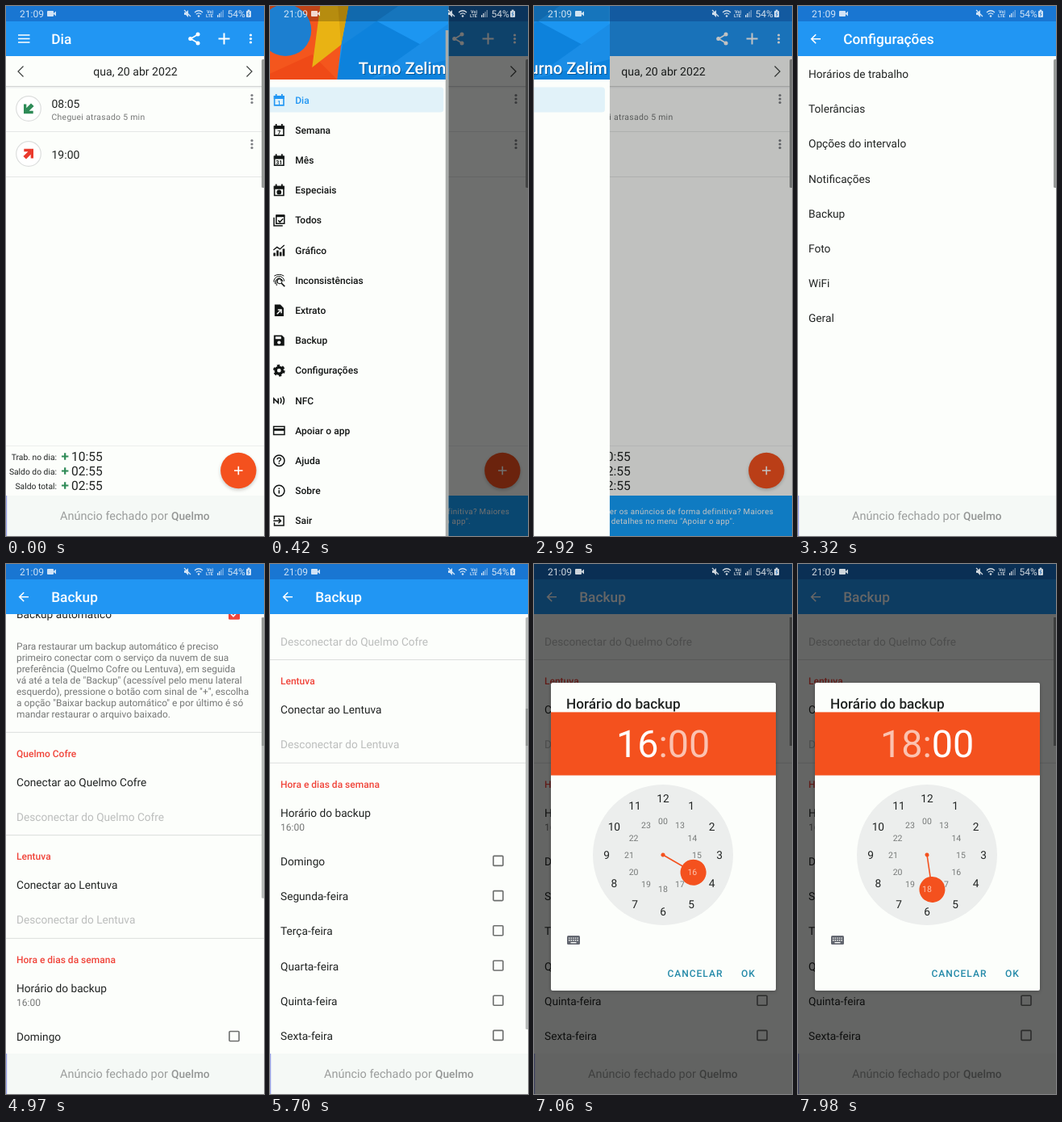
An HTML page that plays this animation: 320 by 656 pixels, repeating every 8000 ms.

```html
<!DOCTYPE html>
<html lang="pt">
<head>
<meta charset="utf-8">
<title>Controle de horas</title>
<style>
html, body { margin: 0; width: 100%; height: 100%; overflow: hidden; background: #fcfefb; }
svg { display: block; width: 100vw; height: 100vh; }
text { font-family: Roboto, sans-serif; text-rendering: geometricPrecision; white-space: pre; }
</style>
</head>
<body>
<svg id="stage" viewBox="0 0 320 656"></svg>
<script>
const LOOP = 8000;
const BLUE = '#2196f3', ORANGE = '#f4511e', RED = '#f0443a';
const INK = '#212423', GREY = '#757776', PAPER = '#fcfefb';

const rect = (x, y, w, h, fill, more = '') =>
  `<rect x="${x}" y="${y}" width="${w}" height="${h}" fill="${fill}" ${more}/>`;
const circle = (x, y, r, fill, more = '') =>
  `<circle cx="${x}" cy="${y}" r="${r}" fill="${fill}" ${more}/>`;
const fill = (d, color = 'currentColor') => `<path d="${d}" fill="${color}"/>`;
const line = (d, color = 'currentColor', w = 1.5, more = '') =>
  `<path d="${d}" fill="none" stroke="${color}" stroke-width="${w}" ${more}/>`;
const text = (x, y, size, str, color = INK, more = '') =>
  `<text x="${x}" y="${y}" font-size="${size}" fill="${color}" ${more}>${str}</text>`;
const group = (id, body, more = '') => `<g id="${id}" ${more}>${body}</g>`;
const at = (x, y, body, more = '') => `<g transform="translate(${x} ${y})" ${more}>${body}</g>`;

const MEDIUM = 'font-weight="500"', MIDDLE = 'text-anchor="middle"', END = 'text-anchor="end"';

// ---- shared pieces

const appBar = title =>
  rect(0, 0, 320, 19, '#1976d2') + rect(0, 19, 320, 43, BLUE) +
  text(56.2, 47, 17.3, title, '#fff', MEDIUM);

const backArrow = line('M28 40.8H17M22.2 35.3L16.7 40.8L22.2 46.3', '#fff', 1.6);

const closedAd =
  rect(0, 606, 320, 50, '#f5f9f6') + rect(0, 606, 1.2, 50, '#9aa4ea') +
  text(67, 636, 14.5, 'Anúncio fechado por', '#9b9d9c') +
  text(205, 636, 13.7, 'Quelmo', '#949695', MEDIUM);

const dots = (x, y, color, gap = 4.5) =>
  [-gap, 0, gap].map(d => circle(x, y + d, 1.6, color)).join('');

const scrollThumb = rect(317, 66, 4, 159, '#979a98', 'rx="1.5"');

const screen = (title, body, bar = backArrow) =>
  rect(0, 0, 320, 656, PAPER) + body + appBar(title) + bar + closedAd;

const status =
  text(17, 13.7, 12, '21:09', '#fff') +
  rect(51, 6, 8, 7, '#fff', 'rx="1"') + fill('M59 9l3-2.5v6l-3-2.5z', '#fff') +
  fill('M221 8h2l3-3v9l-3-3h-2z', '#fff') + line('M221 5l8 8', '#fff', 1.2) +
  line('M234 8q5-4.5 10 0M235.8 10.3q3.2-3 6.4 0', '#fff', 1.2) + circle(239, 12.5, 1.3, '#fff') +
  text(249, 9, 5.4, 'Vo)', '#fff', 'font-weight="700"') +
  text(248, 14, 5.4, 'LTE', '#fff', 'font-weight="700"') +
  [0, 1, 2, 3].map(i => rect(262 + i * 2.2, 11 - i * 2, 1.3, 3 + i * 2, '#fff', i > 1 ? 'opacity=".5"' : '')).join('') +
  text(274.5, 13.7, 12, '54%', '#fff') +
  rect(298, 6, 6, 8, '#fff', 'rx="1"') + rect(299.7, 4.6, 2.6, 2, '#fff') + line('M301.6 7l-1.6 3h2l-1.6 3', '#1976d2', .8);

// ---- day screen

const punchRow = (y, color, turn) => at(28, y,
  circle(0, 0, 15.3, '#fff', 'stroke="#dcdedd" stroke-width="1.2"') +
  `<g transform="rotate(${turn})">${fill('M-6-5.5V6.2H5.7V2.8H.6L6.6-3L3-6.6L-2.7-.8V-5.5z', color)}</g>`);

const total = (i, label, value) => {
  const y = 563 + i * 18;
  return text(63, y - 1.5, 10.3, label, INK, END) +
    line(`M69 ${y - 5.5}h8.4m-4.2-4.2v8.4`, '#2e8b57', 2.2) + text(81, y, 15.6, value);
};

const shareIcon = line('M237.5 35.5L229 40.5L237.5 45.5', '#fff', 1.6) +
  circle(238, 35, 2.5, '#fff') + circle(228.7, 40.5, 2.5, '#fff') + circle(238, 46, 2.5, '#fff');

const dayBody =
  rect(0, 99, 320, 1, '#d3d5d4') + rect(0, 100, 320, 1.5, '#eef0ef') +
  line('M21.5 74.5L15 81L21.5 87.5M298.5 74.5L305 81L298.5 87.5', '#3c3f3d', 1.2) +
  text(160.5, 86, 14.1, 'qua, 20 abr 2022', INK, MIDDLE) +
  punchRow(127, '#2e8b57', 0) + text(56.5, 126, 14, '08:05') +
  text(56.5, 140.5, 10.4, 'Cheguei atrasado 5 min', GREY, 'letter-spacing=".3"') +
  punchRow(183, '#ea3a2d', 180) + text(56.5, 188.5, 14, '19:00') +
  dots(305, 115, '#7d7f84') + dots(305, 171, '#7d7f84') +
  rect(0, 155, 320, 1, '#e5e7e6') + rect(0, 211, 320, 1, '#e5e7e6') +
  rect(0, 544, 320, 1, '#eceeed') +
  total(0, 'Trab. no dia:', '10:55') + total(1, 'Saldo do dia:', '02:55') + total(2, 'Saldo total:', '02:55') +
  circle(288.3, 577, 22.3, '#000', 'opacity=".2" filter="url(#soft)"') +
  circle(288.3, 575, 22.2, ORANGE) + line('M283 575h10.6m-5.3-5.3v10.6', '#fff', 1.6) + scrollThumb;

const dayBar = shareIcon + line('M263.5 40.5h14m-7-7v14', '#fff', 2) + dots(303.5, 40.5, '#fff') +
  line('M15 36h14.5M15 40.5h14.5M15 45h14.5', '#fff', 1.7);

const blueAd = rect(0, 606, 320, 50, '#14a2ff') +
  text(297, 629, 9.8, 'Deseja remover os anúncios de forma definitiva? Maiores', '#fff', END + ' letter-spacing=".3"') +
  text(249, 641, 9.8, 'detalhes no menu "Apoiar o app".', '#fff', END + ' letter-spacing=".3"');

// ---- drawer

const cal = inner => line('M-5.7-4.5H5.7V6.5H-5.7z', undefined, 1.6) + fill('M-6.5-5.3h13v4h-13zM-4.5-7.5h1.8v3h-1.8zM2.7-7.5h1.8v3h-1.8z') + inner;
const calText = s => cal(text(0, 5.3, 7, s, 'currentColor', MIDDLE + ' font-weight="700"'));
const ring = inner => circle(0, 0, 6.7, 'none', 'stroke="currentColor" stroke-width="1.5"') + inner;

const menu = [
  ['Dia', calText('1')],
  ['Semana', calText('7')],
  ['Mês', calText('31')],
  ['Especiais', cal(circle(0, 2.4, 2.9, 'currentColor'))],
  ['Todos', line('M-3.5-5.7H6.5V4H-3.5zM-6.3-3.5V6.8H4.5M-1 .2l2 2L5-2') + fill('M-4-7h11v3h-11z')],
  ['Gráfico', fill('M-7 3h2.6v4H-7zM-3.2 0h2.6v7h-2.6zM.6 2h2.6v5H.6zM4.4-2H7v9H4.4z') + line('M-7-.5L-2.5-4L1-1.5L6.5-6.5', undefined, 1.3)],
  ['Inconsistências', line('M-6.5 2A6.4 6.4 0 1 1 6.5 1M-4.7 4.5A4.8 4.8 0 1 1 4.8 1M-3 6.5Q-4-2 0-2.8Q3-2 2.6 1M-6-5.5Q0-9 6-5.5', undefined, 1) +
    circle(.8, 1.2, 3, 'none', 'stroke="currentColor"') + line('M3 3.5L7 7.5')],
  ['Extrato', fill('M-5.5-7.2H1.5L5.7-3V7.2H-5.5z') + line('M-2.5 4.5L2.5-.5M-1.5-.8H2.8V3.5', '#fff')],
  ['Backup', fill('M-6.5-6.5H3.5L6.5-3.5V6.5H-6.5z') + rect(-4.5, -4.8, 7, 3, '#fff') + circle(0, 2.5, 2.1, '#fff')],
  ['Configurações', circle(0, 0, 4.1, 'none', 'stroke="currentColor" stroke-width="3.4"') +
    circle(0, 0, 6.2, 'none', 'stroke="currentColor" stroke-width="2.4" stroke-dasharray="3.25 3.25"')],
  ['NFC', line('M-6.5 3.5V-2.5L-1 3V-3M1.5-3.5Q4 0 1.5 3.5M4.5-5Q8 0 4.5 5')],
  ['Apoiar o app', line('M-6.7-5H6.7V5H-6.7z') + rect(-6.7, -2.6, 13.4, 2.8, 'currentColor')],
  ['Ajuda', ring(line('M-2.2-1.5Q-2-3.7 0-3.7Q2.3-3.6 2.2-1.7Q2-.6 .8 0Q0 .6 0 1.6M0 2.7V4.1', undefined, 1.4))],
  ['Sobre', ring(line('M0-3.6V-2.1M0-.8V3.6'))],
  ['Sair', line('M-5.8-2V-5.8H5.8V5.8H-5.8V2M-7 0H2M-.8-3L2.2 0L-.8 3')]
];

const poly = (points, color) => `<polygon points="${points}" fill="${color}"/>`;
const header =
  rect(0, 0, 237, 91, '#1c96f1') +
  poly('113,0 237,66 237,91 99,91', '#0d82dc') + poly('113,0 175,0 103,50', '#1687de') +
  poly('140,91 237,22 237,66', '#1a8de6') +
  poly('0,0 80,0 104,48 99,91 0,91', '#f4561d') + poly('0,91 68,60 99,91', '#ef4a17') +
  poly('78,0 113,0 104,48 68,76', '#e9b313') + poly('100,0 113,0 104,48', '#d9a20e') +
  rect(0, 0, 237, 19, '#000', 'opacity=".22"') +
  circle(35, 30, 32, '#1c7fd0') +
  text(235, 85, 20.2, 'Turno Zelim', '#0a3c68', END + ' font-weight="500" opacity=".6"') +
  text(234, 84, 20.2, 'Turno Zelim', '#fff', END + ' ' + MEDIUM);

const drawer =
  rect(0, 0, 237, 656, PAPER) + header + rect(6, 100.5, 225, 31, '#e1f2f9', 'rx="3.5"') +
  menu.map(([label, icon], i) => {
    const y = 116.4 + i * 37.2, color = i ? '#111413' : BLUE;
    return at(27, y, icon, `color="${color}"`) + text(47, y + 4.2, 12, label, color, MEDIUM);
  }).join('') + rect(233.5, 30, 3.5, 626, '#a9acaa', 'id="drawerThumb"');

// ---- settings and backup screens

const settings = ['Horários de trabalho', 'Tolerâncias', 'Opções do intervalo', 'Notificações', 'Backup', 'Foto', 'WiFi', 'Geral']
  .map((s, i) => text(13, 89 + i * 43.2, 13.7, s)).join('') + scrollThumb;

const help = ['Para restaurar um backup automático é preciso', 'primeiro conectar com o serviço da nuvem de sua',
  'preferência (Quelmo Cofre ou Lentuva), em seguida', 'vá até a tela de "Backup" (acessível pelo menu lateral',
  'esquerdo), pressione o botão com sinal de "+", escolha', 'a opção "Baixar backup automático" e por último é só',
  'mandar restaurar o arquivo baixado.'];

const section = (y, title) => rect(0, y + .7, 320, 1, '#dcdedd') + text(13, y + 31.5, 12, title, RED, MEDIUM);
const service = (y, name) => section(y, name) +
  text(13, y + 68, 13.7, 'Conectar ao ' + name) + text(13, y + 111, 13.7, 'Desconectar do ' + name, '#bcbebd');

const backup =
  text(13, 89.7, 13.7, 'Backup automático') + rect(276, 77.6, 14, 14, RED, 'rx="1.5"') + line('M279 84.6l3 3l5.5-6', '#fff', 1.6) +
  help.map((s, i) => text(13, 129.3 + i * 14, 11.9, s, GREY)).join('') +
  service(230, 'Quelmo Cofre') + service(357.3, 'Lentuva') + section(485, 'Hora e dias da semana') +
  circle(188.5, 555.5, 0, '#000', 'id="ripple" clip-path="url(#row)"') +
  text(13, 553, 13.7, 'Horário do backup') + text(13, 570, 12, '16:00', GREY) +
  ['Domingo', 'Segunda-feira', 'Terça-feira', 'Quarta-feira', 'Quinta-feira', 'Sexta-feira', 'Sábado'].map((s, i) => {
    const y = 613 + i * 43.2;
    return text(13, y, 13.7, s) + rect(277, y - 11.6, 12, 12, 'none', 'stroke="#6c6e6d" stroke-width="1.6" rx="1"');
  }).join('');

const backupBody = group('list', backup) +
  rect(317, 66, 4, 0, '#b9bcba', 'id="thumb" rx="1.5"') + rect(317, 66, 4, 159, '#979a98', 'id="thumbDark"');

// ---- time picker

const polar = (deg, r) => [160 + r * Math.sin(deg * Math.PI / 180), 360 - r * Math.cos(deg * Math.PI / 180)];
const hourMark = (deg, r, size, s, color) => {
  const [x, y] = polar(deg, r);
  return text(x, y + size * .36, size, s, color, MIDDLE);
};
let marks = '';
for (let h = 1; h <= 12; h++) {
  marks += hourMark(h * 30, 70, 13.7, h, INK) + hourMark(h * 30, 42, 10.5, h === 12 ? '00' : h + 12, '#777a79');
}
const keyboard = rect(41, 460, 16, 11, '#62666f', 'rx="1.5"') +
  line('M43 463.1h12M43 465.8h12', PAPER, 1.4, 'stroke-dasharray="1.4 1.2"') + rect(45.5, 468, 7, 1.3, PAPER);

const dialog =
  rect(21, 148, 279, 381, '#000', 'opacity=".25" filter="url(#soft)"') +
  rect(21, 147, 279, 381, PAPER, 'rx="2"') + text(40, 179, 17.2, 'Horário do backup', INK, MEDIUM) +
  rect(21, 183.4, 279, 78.2, ORANGE) +
  `<text x="160.2" y="239" font-size="46.7" fill="#fff" ${MIDDLE}><tspan id="hour"></tspan><tspan fill-opacity=".65">:</tspan><tspan id="minute">00</tspan></text>` +
  circle(160, 360, 87, '#eceeed') + marks +
  group('hand', line('M160 360V318', ORANGE, 1.6) + circle(160, 360, 2.5, ORANGE) + circle(160, 316.6, 16, ORANGE)) +
  text(0, 0, 10.5, '', '#fcc3ae', `id="picked" ${MIDDLE}`) + keyboard +
  text(165.4, 511, 12, 'CANCELAR', '#2389a8', MEDIUM + ' letter-spacing="1"') +
  text(257, 511, 12, 'OK', '#2389a8', MEDIUM + ' letter-spacing="1"');

// ---- stage

const stage = document.getElementById('stage');
stage.innerHTML =
  `<defs><filter id="soft" x="-20%" y="-20%" width="140%" height="140%"><feGaussianBlur stdDeviation="2"/></filter>
   <clipPath id="row"><rect x="0" y="526" width="320" height="59.5"/></clipPath></defs>` +
  group('day', screen('Dia', dayBody, dayBar) + group('blueAd', blueAd)) +
  group('settings', screen('Configurações', settings)) +
  group('backup', screen('Backup', backupBody)) +
  rect(0, 0, 320, 656, '#000', 'id="scrim"') +
  group('drawer', drawer) + group('dialog', dialog) + group('status', status, 'opacity=".8"');

const el = {};
stage.querySelectorAll('[id]').forEach(n => el[n.id] = n);
const set = (id, attrs) => { for (const k in attrs) el[id].setAttribute(k, attrs[k]); };
const show = (id, opacity) => set(id, { opacity, display: opacity > 0 ? 'inline' : 'none' });

const seg = (t, start, length) => Math.min(1, Math.max(0, (t - start) / length));
const smooth = p => p * p * (3 - 2 * p);
const out = p => 1 - (1 - p) * (1 - p);

function update(t) {
  // Drawer
  const open = out(seg(t, 90, 446)) * (1 - smooth(seg(t, 2790, 230)));
  set('drawer', { transform: `translate(${-237 * (1 - open)} 0)`, display: open ? 'inline' : 'none' });
  show('drawerThumb', 1 - seg(t, 560, 160));
  show('blueAd', t >= 200 ? 1 : 0);

  // Screens
  const settingsIn = out(seg(t, 3000, 300)), backupIn = out(seg(t, 4340, 150));
  show('settings', settingsIn);
  set('settings', { transform: `translate(0 ${24 * (1 - settingsIn)})` });
  show('backup', backupIn);

  // List scrolling and its indicator
  const p = seg(t, 4870, 730), scroll = 240 * (p + smooth(p)) / 2;
  set('list', { transform: `translate(0 ${-scroll})` });
  const moving = t >= 4870 && t < 6900, shift = Math.max(0, scroll - 22) / 218;
  const darkTop = 66 + (moving ? 113 * shift : 0);
  set('thumb', { height: moving ? 347 + 163 * shift : 0 });
  set('thumbDark', { y: darkTop, height: 225 - darkTop });

  // Row touch
  set('ripple', { r: t < 6560 ? 0 : 20 + (t - 6560) * .5, opacity: .12 * (1 - seg(t, 6860, 160)) });

  // Time picker
  const pop = out(seg(t, 6850, 200)), scale = .92 + .08 * pop;
  show('dialog', pop);
  set('dialog', { transform: `translate(160.5 337.5) scale(${scale}) translate(-160.5 -337.5)` });
  show('scrim', .6 * Math.max(open, pop));

  const deg = 120 + 51.5 * smooth(seg(t, 7150, 600)), hour = 12 + Math.round(deg / 30);
  const [x, y] = polar(hour * 30, 42), minutes = t >= 7980;
  set('hand', { transform: `rotate(${deg} 160 360)` });
  set('picked', { x, y: y + 3.8 });
  set('hour', { 'fill-opacity': minutes ? .65 : 1 });
  set('minute', { 'fill-opacity': minutes ? 1 : .65 });
  el.picked.textContent = el.hour.textContent = hour;
}

function frame() {
  update(performance.now() % LOOP);
  requestAnimationFrame(frame);
}
frame();
</script>
</body>
</html>
```
